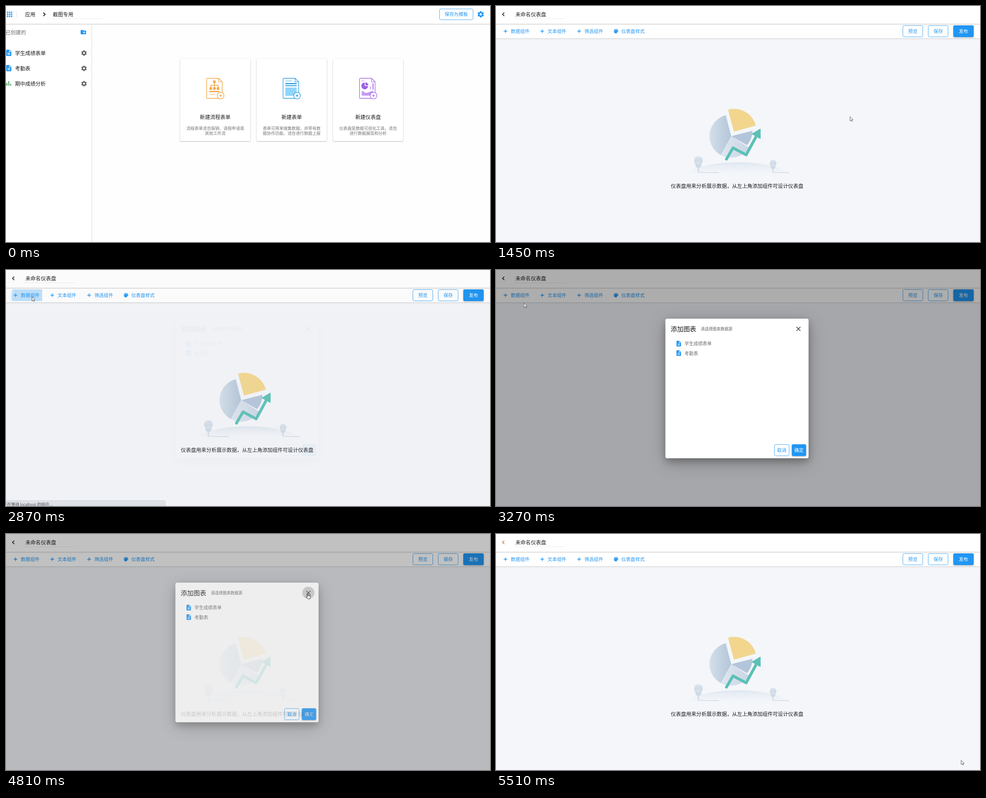
These frames come from a looping animation (1070x524 px, 5.59 s). An HTML page:

```html
<!DOCTYPE html>
<html lang="zh-CN">
<head>
<meta charset="utf-8">
<title>仪表盘</title>
<style>
  html, body { margin: 0; width: 100%; height: 100%; overflow: hidden; background: #fff; }
  svg { display: block; }
  text { font-family: "Noto Sans CJK SC", "Noto Sans CJK", "Noto Sans", sans-serif; white-space: pre; }
  .card { fill: #fff; filter: drop-shadow(0 1px 1px rgba(0,0,0,.24)) drop-shadow(0 0 1px rgba(0,0,0,.1)); }
  .raised { filter: drop-shadow(0 1px 1.5px rgba(0,0,0,.35)); }
  .dialog { filter: drop-shadow(0 7px 8px rgba(0,0,0,.24)) drop-shadow(0 9px 18px rgba(0,0,0,.22)); }
</style>
</head>
<body>
<svg id="stage" width="1070" height="524" viewBox="0 0 1070 524"></svg>
<script>
const LOOP = 5590, BLUE = '#2196f3', INK = '#1c1c1c';

// Drawing helpers; text is placed by the vertical middle of its glyphs
const label = (x, mid, size, str, fill = INK, anchor = 'start') =>
  `<text x="${x}" y="${mid + size * 0.38}" font-size="${size}" fill="${fill}" text-anchor="${anchor}">${str}</text>`;
const box = (x, y, w, h, fill, more = '') =>
  `<rect x="${x}" y="${y}" width="${w}" height="${h}" fill="${fill}" ${more}/>`;
const path = (d, fill, more = '') => `<path d="${d}" fill="${fill}" ${more}/>`;
const line = (d, color, width, more = '') =>
  `<path d="${d}" fill="none" stroke="${color}" stroke-width="${width}" ${more}/>`;
const dot = (x, y, r, fill, more = '') => `<circle cx="${x}" cy="${y}" r="${r}" fill="${fill}" ${more}/>`;
const group = (id, body, more = '') => `<g id="${id}" ${more}>${body}</g>`;
const at = (x, y, scale, body) => `<g transform="translate(${x} ${y}) scale(${scale})">${body}</g>`;

const outlined = (x, y, w, h, str, size = 10.3) =>
  box(x + .5, y + .5, w - 1, h - 1, '#fff', `rx="3" stroke="${BLUE}" stroke-opacity=".8"`) +
  label(x + w / 2, y + h / 2, size, str, BLUE, 'middle');
const filled = (x, y, w, h, str) =>
  box(x, y, w, h, BLUE, 'rx="3" class="raised"') +
  label(x + w / 2, y + h / 2, 10.3, str, '#fff', 'middle');

const gear = (x, y, r, color, hole = '#fff') => {
  let teeth = '';
  for (let a = 0; a < 360; a += 60)
    teeth += box(-r * .27, -r, r * .54, r * .6, color, `rx=".5" transform="rotate(${a})"`);
  return at(x, y, 1, teeth + dot(0, 0, r * .75, color) + dot(0, 0, r * .36, hole));
};
const doc = (x, y, s) => at(x - 12 * s, y - 12 * s, s, path(
  'M14 2H6c-1.1 0-2 .9-2 2v16c0 1.1.9 2 2 2h12c1.1 0 2-.9 2-2V8l-6-6zm2 16H8v-2h8v2zm0-4H8v-2h8v2zm-3-5V3.5L18.5 9H13z', BLUE));
const folder = (x, y, s) => at(x - 12 * s, y - 12 * s, s, path(
  'M20 6h-8l-2-2H4c-1.1 0-2 .9-2 2v12c0 1.1.9 2 2 2h16c1.1 0 2-.9 2-2V8c0-1.1-.9-2-2-2zm-1 8h-3v3h-2v-3h-3v-2h3V9h2v3h3v2z', BLUE));
const plus = (x, y, r, color, w) => line(`M${x - r} ${y}h${2 * r}M${x} ${y - r}v${2 * r}`, color, w);
const palette = (x, y) => at(x, y, 1,
  dot(0, 0, 4.8, BLUE) + dot(3.6, 3.9, 1.9, '#fff') +
  [[-2.9, -.4], [-1.3, -2.7], [1.3, -2.7], [2.9, -.4]].map(([a, b]) => dot(a, b, .8, '#fff')).join(''));

// App page
const sheet = (color, art) =>
  path('M2.5 0H27l8 8v34.5a2 2 0 0 1-2 2H2.5a2 2 0 0 1-2-2V2a2 2 0 0 1 2-2z', '#fff', `stroke="${color}" stroke-width="1.3"`) +
  line('M27 0v8h8', color, 1.2) + art +
  dot(31.5, 38.5, 7.4, '#fff', `stroke="${color}" stroke-width="1.3"`) + plus(31.5, 38.5, 3, color, 1.3);

const flowArt = box(15, 5, 5.5, 5.5, '#f5a344') +
  line('M17.7 10v11M9.5 21v-5.5H26V21', '#f5a344', 1.5) +
  [7, 15, 23].map(x => box(x, 20, 5.5, 5.5, '#f5a344')).join('') +
  box(6.5, 28, 22, 2.8, '#f5a344') + box(6.5, 34.5, 12, 2.5, '#fcdcb2');
const formArt = box(5.5, 5, 15, 2, '#90d5fb') + box(5.5, 10.5, 25, 2.6, '#2f9fe0') +
  box(5.5, 15.5, 25, 2, '#2f9fe0') + box(5.5, 20.5, 25, 18.5, '#90d5fb');
const dashArt = box(5, 4.5, 2.5, 2.5, '#d9b8f8') + box(9, 4.5, 2.5, 2.5, '#d9b8f8') +
  path('M12 17V9.5a7.5 7.5 0 1 0 7.5 7.5z', '#9c5fe6') + path('M13.5 15.5V9a6.5 6.5 0 0 1 6.5 6.5z', '#9c5fe6') +
  box(23.5, 17.5, 2.8, 7.5, '#d9b8f8') + box(29, 11, 2.8, 14, '#c38cf0') +
  path('M5.5 28c4 0 6 4.5 10 4.5S25 28 31 28v10.5H5.5z', '#c79af2');

const card = (x, color, art, title, a, b) =>
  box(x, 117, 155, 183, '#fff', 'rx="3" class="card"') +
  at(x + 58, 160.5, 1, sheet(color, art)) +
  label(x + 77.5, 247, 11.3, title, INK, 'middle') +
  label(x + 77.5, 271.5, 9.15, a, '#757575', 'middle') +
  label(x + 77.5, 283, 9.15, b, '#757575', 'middle');

const header = box(0, 0, 1070, 40, '#fff') + box(0, 39, 1070, 1, '#e9e9e9') +
  box(0, 40, 1070, 1, '#dcdcdc') + box(0, 41, 1070, 1, '#f1f1f1');

let apps = '';
for (let i = 0; i < 9; i++) apps += box(2 + i % 3 * 4.4, 12.6 + Math.floor(i / 3) * 4.4, 3, 3, BLUE);

const row = (y, str) => label(20, y, 11.3, str) + gear(172.5, y, 6, '#616161');

const home = box(0, 0, 1070, 524, '#fefefe') + box(0, 41, 189, 483, '#fff') +
  box(189, 41, 1, 483, '#dcdcdc') + header + apps + box(23, 12, 1, 13, '#e4e4e4') +
  label(42, 18.5, 11.4, '应用') + line('M82.5 14.8l4 3.8-4 3.8', INK, 1.9) +
  label(103.5, 18.5, 11.3, '截图专用') + box(98, 28, 115, 1, '#ececec') +
  outlined(958, 6, 75, 25, '保存为模板') + gear(1049.5, 18.5, 7, BLUE) +
  label(-1, 58.5, 11.3, '已创建的', '#6b6b6b') + folder(171, 58, .6) +
  doc(6.2, 104, .7) + row(104.5, '学生成绩表单') +
  doc(6.2, 138, .7) + row(138.5, '考勤表') +
  box(1, 171, 2, 6, '#43a05c') + box(5.2, 167, 2, 10, '#43a05c') + box(9.4, 173, 2, 4, '#43a05c') +
  row(172.5, '期中成绩分析') +
  card(385, '#f5a344', flowArt, '新建流程表单', '流程表单适合报销、请假申请或', '其他工作流') +
  card(554, '#2f9fe0', formArt, '新建表单', '表单可用来搜集数据，并带有数', '据协作功能，适合进行数据上报') +
  card(723, '#a56ae8', dashArt, '新建仪表盘', '仪表盘是数据可视化工具，适合', '进行数据展现和分析') +
  `<g clip-path="url(#cardClip)">${dot(783, 246, 0, '#000', 'id="cardRipple" fill-opacity=".1"')}</g>`;

// Dashboard editor
const tree = (x, y, r, width) =>
  line(`M${x - .3} ${y + r}V369.5`, '#ccd7e4', 2.2) + line(`M${x - 1} 369.3l${width} .7`, '#d0dae7', 1.6) +
  dot(x, y, r, 'url(#leaf)') + dot(x, y + r * .95, r * .75, 'url(#leaf)');

const chart =
  path('M405 379Q450 348 532 347T665 379z', 'url(#hill)') +
  tree(447.5, 343, 9.6, 46) + tree(612.5, 349, 7.5, 37) +
  path('M520 289L508 242.5A48 48 0 0 0 497 331z', 'url(#slice)') +
  path('M520 289L497 331A48 48 0 0 0 560 315z', 'url(#pale)') +
  path('M520 289L567 277A48 48 0 0 1 555 309z', '#b3c5da') +
  path('M526 279L513 230A50 50 0 0 1 574.5 265.5z', '#f2d68e') +
  line('M509.5 340l14.5-25 29 15.5L575 290', '#5cc1b7', 6.4, 'stroke-linecap="round" stroke-linejoin="round"') +
  path('M584 273.5v20.5l-17.5-10z', '#5cc1b7', 'stroke="#5cc1b7" stroke-width="2" stroke-linejoin="round"') +
  label(533, 400, 11.27, '仪表盘用来分析展示数据，从左上角添加组件可设计仪表盘', INK, 'middle');

const editor = box(0, 0, 1070, 524, '#f4f6fa') + header +
  line('M18.3 14.8l-3.9 3.8 3.9 3.8', '#3a2413', 1.7, 'id="back"') +
  label(43, 18.5, 11.3, '未命名仪表盘') + box(39, 28, 113, 1, '#ececec') +
  box(0, 42, 1070, 30, '#fff') + box(0, 72, 1070, 1, '#cdcfd2') + box(0, 73, 1070, 1, '#e9ebef') +
  box(9, 43, 71, 26, BLUE, 'rx="2" id="hover" fill-opacity=".06"') +
  `<g clip-path="url(#toolClip)">${dot(58, 59, 0, BLUE, 'id="toolRipple" fill-opacity=".24"')}</g>` +
  [[21, '数据组件'], [102.3, '文本组件'], [183.7, '筛选组件']].map(([x, s]) =>
    plus(x, 56, 4, BLUE, 1.4) + label(x + 11.8, 56, 10.3, s, BLUE)).join('') +
  palette(265.3, 56) + label(277, 56, 10.3, '仪表盘样式', BLUE) +
  outlined(899, 43, 45, 26, '预览') + outlined(955, 43, 45, 26, '保存') + filled(1011, 43, 45, 26, '发布') +
  group('chart', chart);

const dialog = box(374.5, 108, 316.5, 310, '#fff', 'rx="4" class="dialog"') +
  label(386, 131, 14.2, '添加图表') + label(453, 131, 8.7, '请选择图表数据源', '#616161') +
  dot(668.5, 130.5, 13.5, '#000', 'id="closeHover" fill-opacity=".2"') +
  line('M664.2 126.4l8.8 8.8m0-8.8l-8.8 8.8', '#4d4d4d', 1.6) +
  doc(404, 163.5, .62) + label(416.8, 163.5, 10, '学生成绩表单', '#6b6b6b') +
  doc(404, 184.5, .62) + label(416.8, 185, 10, '考勤表', '#6b6b6b') +
  outlined(615, 387, 33.5, 26, '取消') + filled(654, 387, 31.5, 26, '确定');

const status = box(-4, 512, 356, 16, '#dee1e6', 'rx="3" stroke="#cdd0d5"') +
  label(-6.5, 520.3, 9, '正在等待 <tspan font-family="\'Open Sans\',\'Noto Sans\',sans-serif" font-size="8.4">localhost</tspan> 的响应...', '#4a4d51');

const arrow = path('M.4.4v9.4l2.2-2 1.5 3.3 1.5-.7-1.4-3.2h2.9z', '#fff', 'stroke="#3c3c3c" stroke-width=".8"');
const hand = path('M-.8 1q.9-1.2 1.8 0v4q4.5.2 5 1.6.3 2-.8 4.4v2H0l-3.3-4.4q0-1.6 1.2-1l1.3 1.2z', '#fff', 'stroke="#222" stroke-width=".9" stroke-linejoin="round"') +
  line('M1 5v2.4M2.8 5.4v2M4.5 5.9v1.8', '#222', .7);

const ramp = (id, a, b, dir = 'x2="1" y2="0"', end = 1) =>
  `<linearGradient id="${id}" ${dir}><stop stop-color="${a}"/><stop offset="1" stop-color="${b}" stop-opacity="${end}"/></linearGradient>`;

document.getElementById('stage').innerHTML =
  '<defs>' + ramp('hill', '#dfe6ef', '#f4f6fa', 'x2="0" y2="1"', 0) + ramp('leaf', '#dbe4ee', '#c9d5e3', 'x2="0" y2="1"') +
  ramp('slice', '#d3dfea', '#b3c5d9') + ramp('pale', '#dfe6f0', '#c9d5e4') +
  `<clipPath id="cardClip">${box(723, 117, 155, 183, '#000')}</clipPath>` +
  `<clipPath id="toolClip">${box(9, 43, 71, 26, '#000')}</clipPath></defs>` +
  group('home', home) + group('editor', editor) +
  box(0, 0, 1070, 524, '#000', 'id="shade"') + group('dialog', dialog) + group('status', status) +
  group('cursor', group('arrow', arrow) + group('hand', hand));

// Motion: [time, x, y]
const MOUSE = [
  [130, 998, 451], [300, 905, 355], [450, 815, 272], [530, 783, 246], [1700, 782, 245],
  [1850, 690, 214], [2000, 440, 140], [2160, 190, 82], [2320, 87, 56], [2410, 66, 57],
  [2560, 57, 59], [3110, 57, 59], [3270, 61, 73], [3400, 140, 112], [3570, 301, 155],
  [3640, 301, 155], [3850, 485, 164], [4060, 646, 151], [4210, 666, 136], [4270, 666, 136],
  [4400, 667, 131], [4940, 667, 131], [5060, 780, 222], [5200, 973, 369],
  [5350, 1012, 452], [5490, 1028, 502]
];
const DIALOG = [[2860, 0], [3085, 1], [4770, 1], [4945, 0]];
const CARD_RIPPLE = [[520, 0], [600, 75]];
const TOOL_RIPPLE = [[2690, 0], [2780, 29], [2950, 60]];

const track = (keys, t) => {
  const i = keys.findIndex(k => k[0] > t);
  if (i === 0) return keys[0].slice(1);
  if (i < 0) return keys[keys.length - 1].slice(1);
  const a = keys[i - 1], b = keys[i], p = (t - a[0]) / (b[0] - a[0]);
  return a.slice(1).map((v, n) => v + (b[n + 1] - v) * p);
};
const within = (t, a, b) => t >= a && t < b;
const el = id => document.getElementById(id);
const ui = {};
for (const id of ['home', 'editor', 'chart', 'shade', 'dialog', 'status', 'cursor', 'arrow', 'hand',
  'back', 'hover', 'cardRipple', 'toolRipple', 'closeHover']) ui[id] = el(id);
const show = (id, on) => ui[id].style.display = on ? '' : 'none';

function render(t) {
  const onEditor = t >= 750;
  show('home', !onEditor);
  show('editor', onEditor);
  show('chart', t >= 1240);
  show('status', within(t, 840, 1380) || within(t, 2700, 3030));
  show('hover', within(t, 2380, 3110));
  show('toolRipple', within(t, 2690, 3110));
  show('closeHover', within(t, 4690, 5000));
  ui.cardRipple.setAttribute('r', track(CARD_RIPPLE, t)[0]);
  ui.toolRipple.setAttribute('r', track(TOOL_RIPPLE, t)[0]);
  ui.back.setAttribute('stroke', t >= 5200 ? '#b08d68' : '#3a2413');

  const open = track(DIALOG, t)[0];
  ui.shade.setAttribute('opacity', open * .32);
  ui.dialog.setAttribute('opacity', open);
  show('dialog', open > 0);

  const [x, y] = track(MOUSE, t);
  const pointing = within(t, 470, 750) || within(t, 4170, 4950);
  ui.cursor.setAttribute('transform', `translate(${x} ${y})`);
  show('cursor', t >= 130);
  show('arrow', !pointing);
  show('hand', pointing);
}

const start = performance.now();
function tick() {
  render((performance.now() - start) % LOOP);
  requestAnimationFrame(tick);
}
render(0);
requestAnimationFrame(tick);
</script>
</body>
</html>
```
